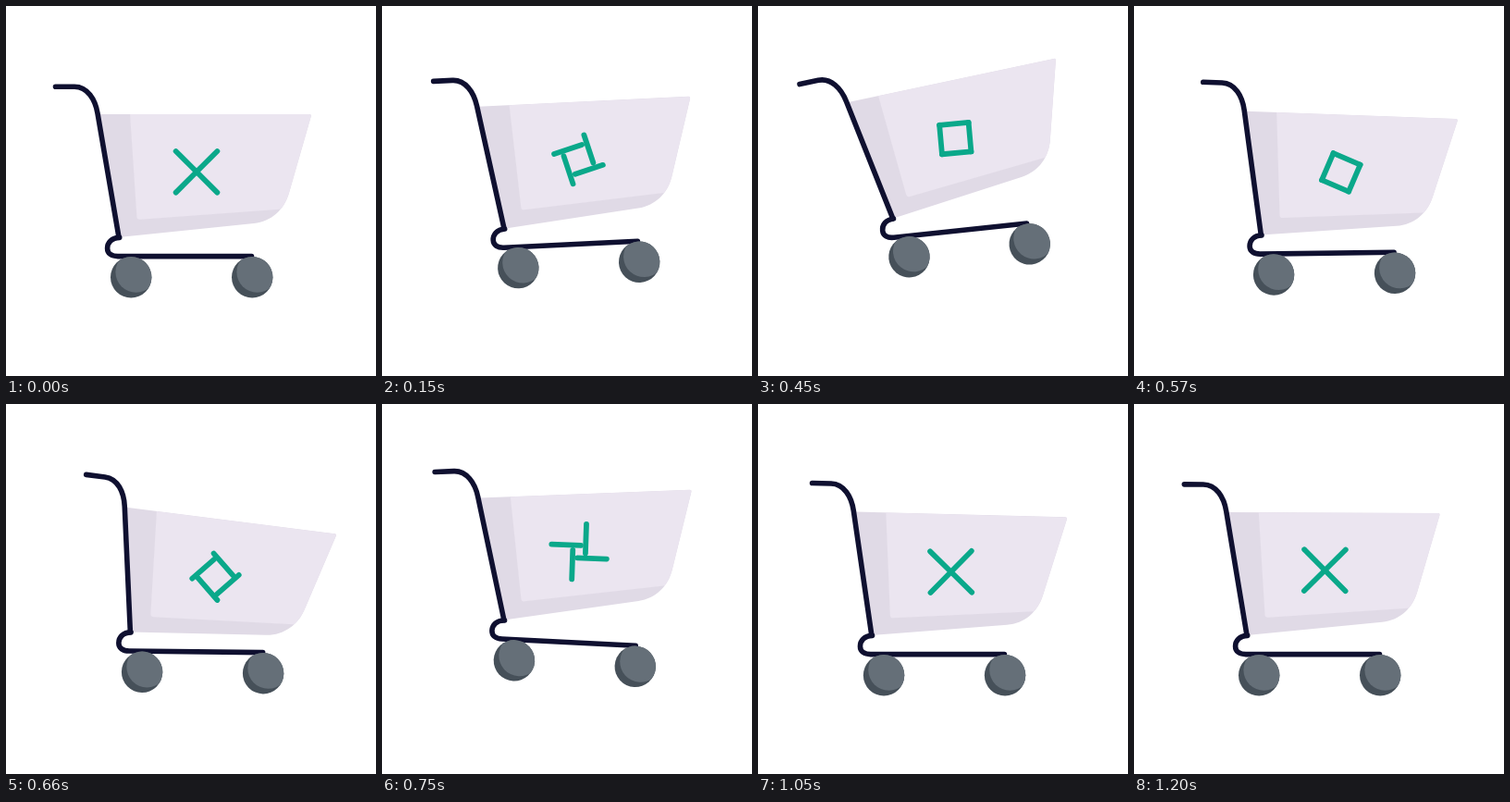
Animation of 400x400 px, one loop 2.23 s. Source, as an HTML page:

```html
<!DOCTYPE html>
<html lang="en">
<head>
<meta charset="utf-8">
<title>Shopping cart</title>
<style>
  html, body { margin: 0; width: 100%; height: 100%; overflow: hidden; background: #fff; }
  svg { display: block; width: 100%; height: 100%; }
  .line { fill: none; stroke: #0f1030; stroke-width: 5.6; stroke-linecap: round; stroke-linejoin: round; }
  #cross { stroke: #0aa88a; stroke-width: 5.8; stroke-linecap: round; }
</style>
</head>
<body>
<svg viewBox="0 0 400 400">
  <defs>
    <path id="tub" d="M101 117H328Q330.3 117 329.7 119.4L306 202C301 220 287 233 268 235L122 250Z"/>
    <clipPath id="tubClip"><use href="#tub"/></clipPath>
    <clipPath id="rim"><circle r="22.2"/></clipPath>
    <g id="wheel">
      <circle r="22.2" fill="#465059"/>
      <circle cx="5.4" cy="-5.6" r="22.2" fill="#656f78" clip-path="url(#rim)"/>
    </g>
  </defs>
  <g id="cart">
    <g id="basket">
      <use href="#tub" fill="#e0dae6"/>
      <path d="M134 116L141.4 227.7Q141.6 231 145 230.7L296 219.8L340 215V116Z" fill="#ebe5f0" clip-path="url(#tubClip)"/>
      <g id="cross"></g>
      <path class="line" d="M53.5 87.2H74C88 87.2 96.5 101 99 116L122 250"/>
    </g>
    <path class="line" d="M122.7 250.4C114 250.6 109.6 256 109.6 262C109.6 267.5 114 270.6 121 270.6H265.5"/>
    <use href="#wheel" x="135.2" y="293.2"/>
    <use href="#wheel" x="266.2" y="293.2"/>
  </g>
</svg>
<script>
const LOOP = 2230, STEP = 30, END = 1200;
const ARM = 15.8; // half a stick
const $ = id => document.getElementById(id);
const place = (el, transform) => el.setAttribute("transform", transform);

// Sine ease from 0 to 1 between two times.
function ease(t, from, to) {
  const s = Math.min(1, Math.max(0, (t - from) / (to - from)));
  return Math.sin(s * Math.PI / 2) ** 2;
}
const hop = (t, from, peak, to) => ease(t, from, peak) - ease(t, peak, to);

// Extremes of the basket's wobble: [time, degrees].
const swings = [[270, 0], [420, -6.4], [655, 6.6], [775, -6.4], [960, 2], [1200, 0.3]];
const wobble = t => swings.slice(1).reduce((sum, [time, angle], i) =>
  sum + (angle - swings[i][1]) * ease(t, swings[i][0], time), 0);

const sticks = [45, 135, 225, 315].map(angle => {
  const el = document.createElementNS("http://www.w3.org/2000/svg", "path");
  el.setAttribute("d", `M${-ARM} 0H${ARM}`);
  $("cross").append(el);
  return { el, angle };
});

function draw(now) {
  const t = Math.min(END, Math.floor(now % LOOP / STEP) * STEP);

  // A big hop back on the rear wheels, then a small one forward.
  const big = hop(t, 0, 370, 620), small = hop(t, 620, 750, 980);
  const shift = 27 * ease(t, 0, 360) - 13 * ease(t, 360, 630) - 14 * ease(t, 520, 1150);
  const lift = -26.5 * big - 16.5 * small;
  const lean = -7.9 * big + 2.85 * small;
  place($("cart"), `translate(${shift} ${lift}) rotate(${lean} 122 250)`);
  place($("basket"), `rotate(${wobble(t)} 122 250)`);

  // Each stick circles the centre and turns sideways to close a square.
  const orbit = 60 * ease(t, 100, 580) + 30 * ease(t, 300, 1200);
  const twist = 90 * (ease(t, 590, 840) - ease(t, 0, 240));
  for (const { el, angle } of sticks)
    place(el, `translate(206 179.3) rotate(${angle + orbit}) translate(${ARM} 0) rotate(${twist})`);
}

let start;
function tick(now) {
  start ??= now;
  draw(now - start);
  requestAnimationFrame(tick);
}
draw(0);
requestAnimationFrame(tick);
</script>
</body>
</html>
```
